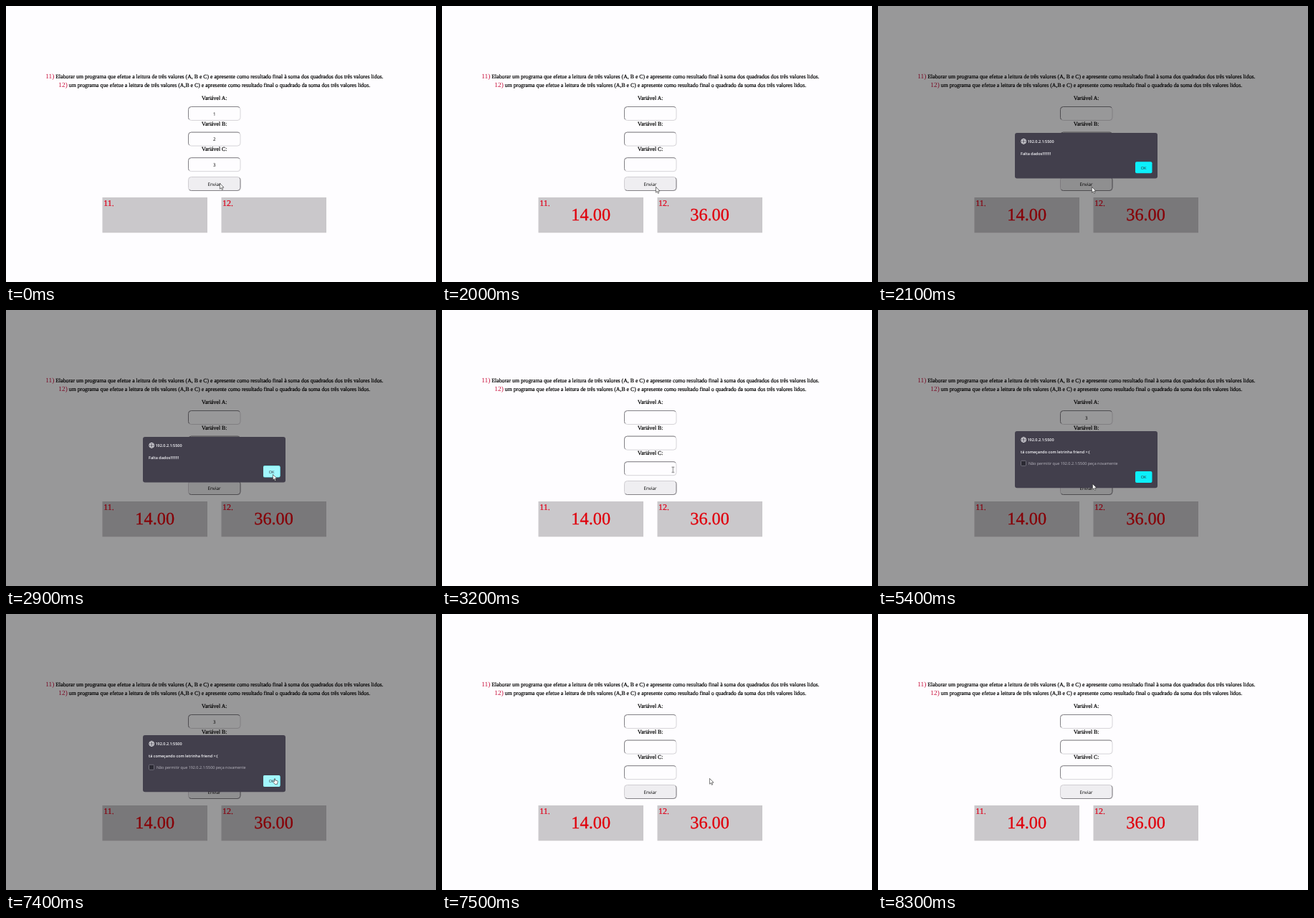
Animation, 600 px wide and 385 px high, one loop 8.8 s. Source, as an HTML page:

```html
<!DOCTYPE html>
<html lang="pt">
<head>
<meta charset="utf-8">
<title>Leitura de três valores</title>
<style>
html, body { margin: 0; width: 100%; height: 100%; overflow: hidden; background: #fefdff; }
svg { display: block; width: 600px; height: 385px; text-rendering: geometricPrecision; }
.serif { font: 7.82px "Liberation Serif", "Times New Roman", serif; stroke: #000; stroke-width: .2; }
.sans { font: 6.3px "Open Sans", "Noto Sans", sans-serif; }
.mid { text-anchor: middle; }
.num { font-size: 9.36px; fill: #c8103c; stroke: none; }
.tag { font-size: 12px; fill: #e0001a; stroke: #e0001a; }
.result { font-size: 24.3px; fill: #e0000c; stroke: #e0000c; stroke-width: .3; }
.box { fill: #cac8cb; }
.edge { fill: none; stroke: #838186; }

.dialog { font-size: 5.45px; font-weight: 600; fill: #fbfbfe; }
.dim { fill: #000; opacity: .4; }
.panel { fill: #423f4c; }
.note { font-size: 5.42px; font-weight: 400; fill: #bab8c1; }
.ok { fill: #0cf0fb; }
.lit { fill: #a2f7fd; }
.okText { fill: #2b2a33; font-weight: 400; }
.globe { fill: none; stroke: #fbfbfe; stroke-width: .7; }

/* visibility switches: hard cuts on an 8.8 s clock */
.cut { opacity: 0; animation: 8.8s step-end infinite; }
.first { animation-name: first; }
.results { animation-name: results; }
.alertA { animation-name: alertA; }
.alertB { animation-name: alertB; }
.litA { animation-name: litA; }
.litB { animation-name: litB; }
.valueA { animation-name: valueA; }
.valueB { animation-name: valueB; }
.valueC { animation-name: valueC; }
.caret { animation-name: caret; }
.arrow { animation-name: arrow; }
.beam { animation-name: beam; }
.hand { animation-name: hand; }
@keyframes first { 0% { opacity: 1 } 5.68%, to { opacity: 0 } }
@keyframes results { 0% { opacity: 0 } 5.68%, to { opacity: 1 } }
@keyframes alertA { 0%, 34.09%, to { opacity: 0 } 23.86% { opacity: 1 } }
@keyframes alertB { 0%, 85.22%, to { opacity: 0 } 59.09% { opacity: 1 } }
@keyframes litA { 0%, 34.09%, to { opacity: 0 } 31.5% { opacity: 1 } }
@keyframes litB { 0%, 85.22%, to { opacity: 0 } 75% { opacity: 1 } }
@keyframes valueA { 0%, 85.22%, to { opacity: 0 } 47.72% { opacity: 1 } }
@keyframes valueB { 0%, 85.22%, to { opacity: 0 } 43.18% { opacity: 1 } }
@keyframes valueC { 0%, 85.22%, to { opacity: 0 } 37.49% { opacity: 1 } }
@keyframes caret { 0%, 55.68%, to { opacity: 0 } 47.72% { opacity: 1 } }
@keyframes arrow { 0%, 53.4%, 85.22%, to { opacity: 1 } 35.2%, 76.13% { opacity: 0 } }
@keyframes beam { 0%, 53.4%, to { opacity: 0 } 35.2% { opacity: 1 } }
@keyframes hand { 0%, 85.22%, to { opacity: 0 } 76.13% { opacity: 1 } }

.pointer { animation: roam 8.8s ease-in-out infinite; }
@keyframes roam {
  0%, 15.9% { transform: translate(298px, 247px) }
  22.72%, 27.27% { transform: translate(298px, 252px) }
  31.8%, 34.09% { transform: translate(372px, 229px) }
  37.49% { transform: translate(308px, 221px) }
  38.63%, 40.9% { transform: translate(302px, 221px) }
  43.18% { transform: translate(301px, 186px) }
  46.59%, 49.9% { transform: translate(301px, 150px) }
  52.27% { transform: translate(301px, 232.5px) }
  54.54%, 71.59% { transform: translate(299px, 242px) }
  76.13%, 85.22% { transform: translate(373px, 229px) }
  92.04%, to { transform: translate(420px, 400px) }
}
</style>
</head>
<body>
<svg viewBox="0 0 600 385">
  <defs>
    <g id="field">
      <rect x="254.5" y=".5" width="72.5" height="19" rx="4" fill="#fefdff" stroke="#d6d4d8"/>
      <path class="edge" d="M255.7 18.3Q254.5 17 254.5 15.5V4.5Q254.5 .5 258.5 .5H323Q325 .5 326 1.8"/>
    </g>
    <g id="globe" class="globe">
      <circle r="3.5"/>
      <ellipse rx="1.6" ry="3.5"/>
      <path d="M-3.3-1.2H3.3M-3.3 1.2H3.3"/>
    </g>
    <rect id="ok" x="359" width="23.5" height="16" rx="2"/>
  </defs>

  <rect width="600" height="385" fill="#fefdff"/>

  <g class="serif">
    <text x="55.2" y="101.2"><tspan class="num">11)</tspan> Elaborar um programa que efetue a leitura de três valores (A, B e C) e apresente como resultado final à soma dos quadrados dos três valores lidos.</text>
    <text x="73.3" y="112.5"><tspan class="num">12)</tspan> um programa que efetue a leitura de três valores (A,B e C) e apresente como resultado final o quadrado da soma dos três valores lidos.</text>
    <g class="mid">
      <text x="290.8" y="131.2">Variável A:</text>
      <text x="290.8" y="166.8">Variável B:</text>
      <text x="290.8" y="202.4">Variável C:</text>
    </g>
  </g>

  <use href="#field" y="140"/>
  <use href="#field" y="175.6"/>
  <use href="#field" y="211.2"/>
  <rect x="254.5" y="238.5" width="72.5" height="19" rx="4" fill="#efeef1" stroke="#d0ced2"/>
  <path class="edge" d="M255.7 256.3Q257 257.5 258.5 257.5H323Q327 257.5 327 253.5V242.5Q327 241 325.8 239.7"/>

  <g class="sans mid">
    <text x="290.6" y="250.6">Enviar</text>
    <g class="cut first">
      <text x="290.8" y="152.7">1</text>
      <text x="290.8" y="188.3">2</text>
      <text x="290.8" y="223.9">3</text>
    </g>
    <text class="cut valueA" x="290.8" y="152.7">3</text>
    <text class="cut valueB" x="290.8" y="188.3">2</text>
    <text class="cut valueC" x="290.8" y="223.9">a</text>
    <path class="cut caret" d="M293.3 146.5V153.5" stroke="#222" stroke-width=".7"/>
  </g>

  <rect class="box" x="134.5" y="267" width="146.5" height="49.3"/>
  <rect class="box" x="300.5" y="267" width="146.5" height="49.3"/>
  <g class="serif">
    <text class="tag" x="136.2" y="278.6">11.</text>
    <text class="tag" x="302" y="278.6">12.</text>
    <g class="cut results">
      <text class="result mid" x="207.7" y="299.4">14.00</text>
      <text class="result mid" x="373.6" y="299.4">36.00</text>
    </g>
  </g>

  <g class="cut alertA">
    <rect class="dim" width="600" height="385"/>
    <g class="sans dialog">
      <rect class="panel" x="191" y="177" width="199" height="63.5" rx="3"/>
      <use href="#globe" x="203.2" y="188.8"/>
      <text x="208.5" y="191">192.0.2.1:5500</text>
      <text x="199" y="208">Falta dados!!!!!!!!</text>
      <use href="#ok" class="ok" y="217.3"/>
      <use href="#ok" class="lit cut litA" y="217.3"/>
      <text class="okText mid" x="370.6" y="227.5">OK</text>
    </g>
  </g>

  <g class="cut alertB">
    <rect class="dim" width="600" height="385"/>
    <g class="sans dialog">
      <rect class="panel" x="191" y="169" width="199" height="79.3" rx="3"/>
      <use href="#globe" x="203.2" y="181"/>
      <text x="208.5" y="183.2">192.0.2.1:5500</text>
      <text x="199" y="200.2">tá começando com letrinha friend &gt;:(</text>
      <rect x="199.5" y="210.3" width="7" height="7" rx="1" fill="#2b2a33" stroke="#85838f" stroke-width=".7"/>
      <text class="note" x="210" y="215.9">Não permitir que 192.0.2.1:5500 peça novamente</text>
      <use href="#ok" class="ok" y="225"/>
      <use href="#ok" class="lit cut litB" y="225"/>
      <text class="okText mid" x="370.6" y="235.2">OK</text>
    </g>
  </g>

  <g class="pointer">
    <path class="cut arrow" d="M.4 .4V8.2L2.2 6.6L3.4 9.4L4.7 8.8L3.5 6.1H6Z" fill="#fff" stroke="#222" stroke-width=".6"/>
    <path class="cut beam" d="M-1.8-3.7H1.8M0-3.7V3.7M-1.8 3.7H1.8" fill="none" stroke="#444" stroke-width=".7"/>
    <path class="cut hand" d="M1.4 5V.8Q2-.2 2.6 .8V3L5.6 3.6Q6.4 4 6.2 5L5.5 8.4H2.2L-.2 5.4Q.4 4.2 1.4 5Z" fill="#fff" stroke="#222" stroke-width=".6"/>
  </g>
</svg>
</body>
</html>
```
